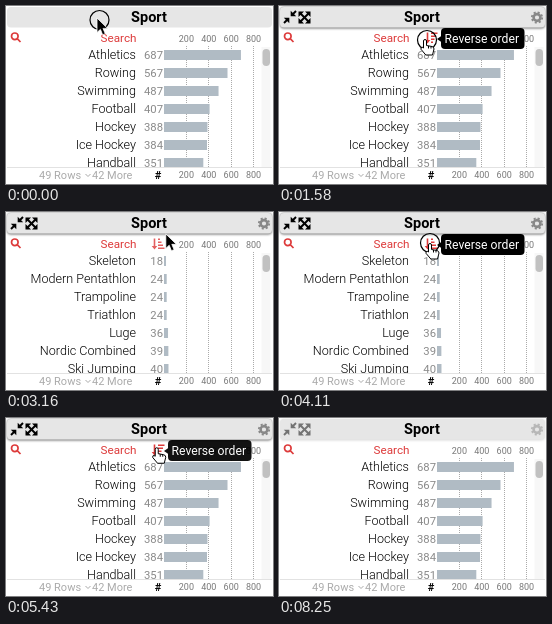
An HTML page that plays this animation: 267x178 px, repeating every 8.35 s.

```html
<!DOCTYPE html>
<html lang="en">
<head>
<meta charset="utf-8">
<title>Sortable list</title>
<style>
  html, body { margin: 0; width: 100%; height: 100%; overflow: hidden; background: #fff; }
  svg { display: block; width: 267px; height: 178px; font-family: Roboto, Arial, sans-serif; }
  .end { text-anchor: end; }
  .mid { text-anchor: middle; }
  .name { font-size: 12.6px; font-weight: 300; fill: #000; }
  .count { font-size: 11.3px; fill: #8a8a8a; }
  .tick { font-size: 9px; fill: #777; }
  .foot { font-size: 11px; fill: #aaa; }
  .red { fill: #dd3b3b; }
</style>
</head>
<body>
<svg viewBox="0 0 267 178">
  <defs>
    <clipPath id="view"><rect y="40" width="254" height="121"/></clipPath>
    <filter id="soft" x="-5%" y="-30%" width="110%" height="160%"><feGaussianBlur stdDeviation="1"/></filter>
    <g id="out"><path d="M0 0L5 5" stroke="#000" stroke-width="2"/><path d="M6 .5V6H.5Z"/></g>
    <g id="in"><path d="M2 2L6 6" stroke="#000" stroke-width="2"/><path d="M.7 6.200V.7H6.200Z"/></g>
  </defs>

  <rect id="glow" x="1" y="1" width="265" height="21.5" rx="4" fill="#777" filter="url(#soft)"/>
  <rect x="1" y="1" width="265" height="20.5" rx="4" fill="#e6e6e6"/>
  <text class="mid" x="143" y="16" font-size="14.5" font-weight="700">Sport</text>
  <g id="tools">
    <g id="arrows"></g>
    <g fill="none" stroke="#888">
      <circle cx="258" cy="11.5" r="3.4" stroke-width="2.6"/>
      <circle cx="258" cy="11.5" r="5.2" stroke-width="1.8" stroke-dasharray="2.1 1.984"/>
    </g>
  </g>

  <g fill="none" stroke="#dd3b3b" stroke-width="1.7">
    <circle cx="8.800" cy="30.300" r="3.3"/>
    <path d="M11.200 32.700L14.500 36"/>
  </g>
  <text class="end red" x="130.500" y="36" font-size="11.7">Search</text>
  <g id="sort" class="red">
    <path d="M147.700 26.500H149.300V34H151.300L148.500 37.500 145.700 34H147.700Z"/>
    <path id="bars" fill="none" stroke="#dd3b3b" stroke-width="1.5"/>
  </g>

  <g id="axis"></g>
  <g clip-path="url(#view)"><g id="desc"></g><g id="asc"></g></g>
  <rect x="255.500" y="41" width="9" height="120" fill="#f7f7f7"/>
  <rect x="256.500" y="43" width="7.500" height="17" rx="3.7" fill="#c1c1c1"/>

  <path d="M1 161.500H266" stroke="#e2e2e2"/>
  <text class="foot" x="33" y="173">49 Rows</text>
  <path d="M79.500 168L82 170.500 84.500 168" fill="none" stroke="#aaa"/>
  <text class="foot" x="86" y="173">42 More</text>
  <text class="mid" x="152" y="173" font-size="11" font-weight="700">#</text>

  <g id="tip">
    <path d="M158 33L163 29.500V36.500Z"/>
    <rect x="162" y="22" width="83.500" height="21" rx="4"/>
    <text x="165.500" y="36.500" font-size="12.2" fill="#fff">Reverse order</text>
  </g>

  <circle id="ring" r="9.5" fill="none" stroke="#000" stroke-width="1.2"/>
  <path id="arrow" d="M0 0V14.500L3.400 11.300 5.600 16.800 8.300 15.700 6 10.400H10.600Z" stroke="#fff" stroke-width=".8"/>
  <path id="hand" fill="#fff" stroke="#000" stroke-linejoin="round"
    d="M-1.500 8V1a1.500 1.500 0 0 1 3 0V5.500L7 6.500Q9 7 9 9L7.500 15H.800L-4 9.300Q-4.300 7-2.800 7.200ZM3.500 6V8.500M6 6.500V8.500"/>
</svg>
<script>
const LOOP = 8350, ROW = 18, ROWS = 49, UNIT = 0.112;
const $ = id => document.getElementById(id);
const show = (id, alpha) => $(id).setAttribute('opacity', alpha);
const move = (el, x, y) => el.setAttribute('transform', `translate(${x} ${y})`);

const lists = {
  desc: { Athletics: 687, Rowing: 567, Swimming: 487, Football: 407,
          Hockey: 388, 'Ice Hockey': 384, Handball: 351 },
  asc: { Skeleton: 18, 'Modern Pentathlon': 24, Trampoline: 24, Triathlon: 24,
         Luge: 36, 'Nordic Combined': 39, 'Ski Jumping': 40 }
};
for (const id in lists) {
  $(id).innerHTML = Object.entries(lists[id]).map(([name, n]) => `<g>
    <text class="name end" x="130" y="53">${name}</text>
    <text class="count end" x="157" y="53">${n}</text>
    <rect x="158" y="44" width="${n * UNIT}" height="10" fill="#b0bbc4"/></g>`).join('');
}

$('axis').innerHTML = [200, 400, 600, 800].map(v => {
  const x = 158 + v * UNIT;
  return `<path d="M${Math.floor(x) + 0.5} 40V161" stroke="#aaa" stroke-dasharray="1 1"/>
    <text class="tick mid" x="${x}" y="36">${v}</text>
    <text class="tick mid" x="${x}" y="172">${v}</text>`;
}).join('');

const spin = (id, x, y, angles) => angles.map(a =>
  `<use href="#${id}" transform="translate(${x} ${y}) rotate(${a})"/>`).join('');
$('arrows').innerHTML = spin('in', 11, 11, [-90, 90]) + spin('out', 25.5, 11.5, [0, 90, 180, 270]);

const ramp = (t, a, b) => Math.min(1, Math.max(0, (t - a) / (b - a)));
const pulse = (t, on, off, fade = 150) => ramp(t, on, on + fade) - ramp(t, off, off + fade);
const ease = p => p * p * (3 - 2 * p);

const spots = {
  start: [91, 12], button: [146, 34], bar: [165, 16], again: [151, 32],
  above: [149, 18], right: [207, 8], list: [58, 98], away: [-20, 150]
};
const moves = [
  { from: 60, to: 1000, spot: 'button' },
  { from: 2400, to: 2800, spot: 'bar' },
  { from: 3000, to: 3390, spot: 'again' },
  { from: 5380, to: 5610, spot: 'above' },
  { from: 5660, to: 5900, spot: 'right' },
  { from: 6790, to: 7190, spot: 'list' },
  { from: 7730, to: 8050, spot: 'away' }
];
const clicks = [
  { at: 0, x: 93.5, y: 14 }, { at: 1580, x: 148, y: 34 }, { at: 4110, x: 151, y: 31 }
];

function pointer(t) {
  return moves.reduce(([x, y], m) => {
    const p = ease(ramp(t, m.from, m.to)), [tx, ty] = spots[m.spot];
    return [x + (tx - x) * p, y + (ty - y) * p];
  }, spots.start);
}

// Rows glide up from the far end of the list, each a little later than the last.
function place(id, t, firstEnd, lag, duration) {
  [...$(id).children].forEach((row, i) => {
    const left = Math.min(0.5, Math.max(0, (firstEnd + lag * i - t) / duration));
    move(row, 0, ROW * i + 4 * left ** 3 * ROW * (ROWS - 1 - 2 * i));
  });
}

function draw(t) {
  const hover = ramp(t, 60, 360) - ramp(t, 8000, 8500);
  show('tools', hover);
  show('glow', hover * hover);

  const returned = t > 4400;
  place('desc', t, returned ? 4941 : -LOOP, 30, 500);
  show('desc', returned ? 1 : 1 - ramp(t, 1640, 1800));
  place('asc', t, 1850, 20, 400);
  show('asc', t < 1690 ? 0 : 1 - ramp(t, 4160, 4390));

  const rising = t >= 1690 && t < 4170;
  $('bars').setAttribute('d', [0, 1, 2, 3].map(i =>
    `M152 ${27.3 + 3 * i}h${2 + 1.5 * (rising ? i : 3 - i)}`).join(''));
  show('sort', pulse(t, 700, 2560) + pulse(t, 3040, 5660));
  show('tip', pulse(t, 910, 2450) + pulse(t, 3220, 5420));

  const click = clicks.find(c => t >= c.at && t < c.at + 170);
  show('ring', click ? 1 - ramp(t, click.at + 100, click.at + 170) : 0);
  if (click) move($('ring'), click.x, click.y);

  const [x, y] = pointer(t);
  const onButton = Math.abs(x - 148) < 9 && y > 25;
  move($('arrow'), x, y);
  move($('hand'), x, y);
  show('arrow', onButton ? 0 : 1);
  show('hand', onButton ? 1 : 0);
}

const start = performance.now();
function tick() {
  draw((performance.now() - start) % LOOP);
  requestAnimationFrame(tick);
}
draw(0);
requestAnimationFrame(tick);
</script>
</body>
</html>
```
